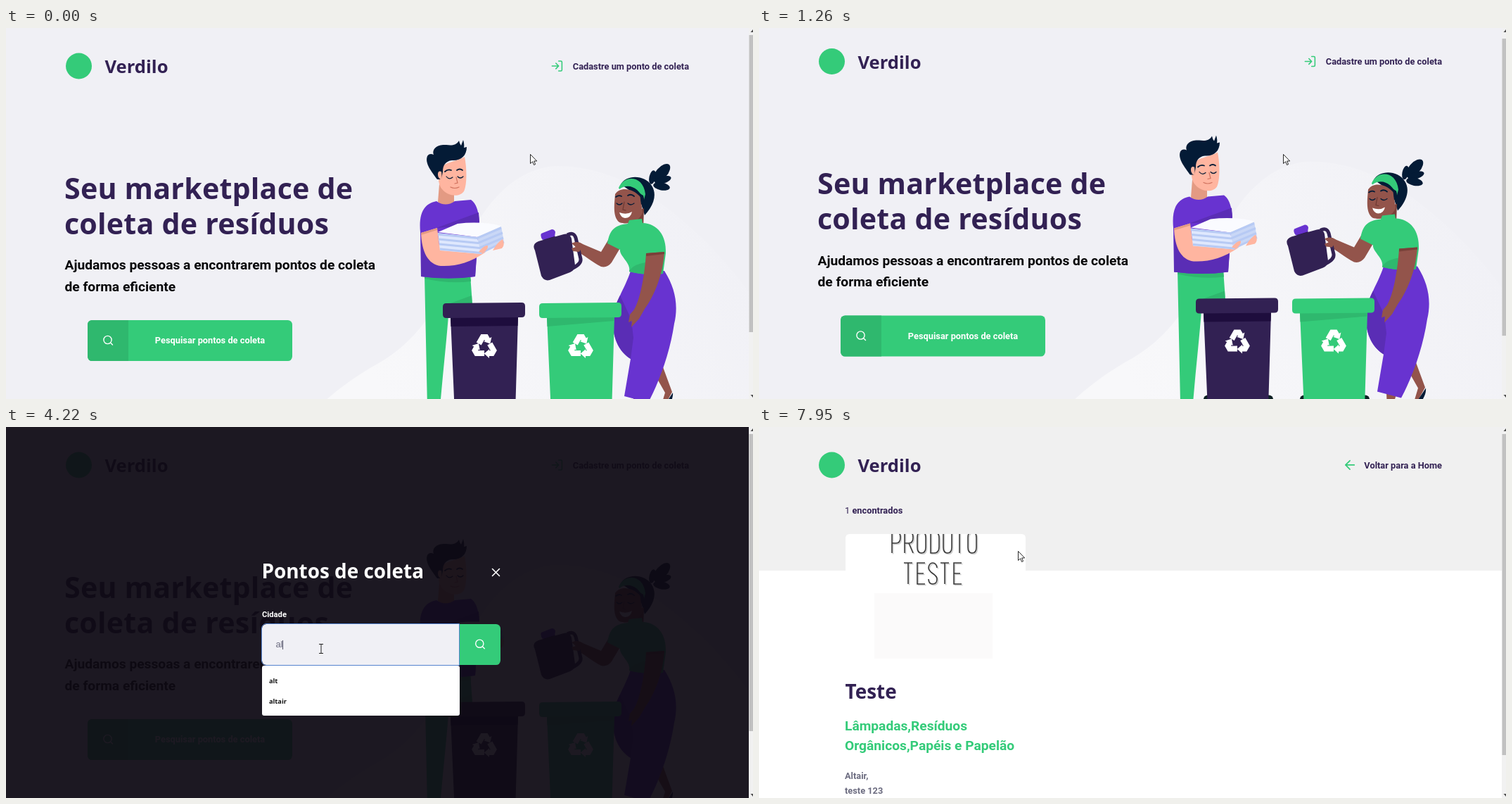
Write an HTML page that moves like this. It is 1062 px wide and 527 px high and loops after 8 s.

```html
<!DOCTYPE html>
<html lang="pt-BR">
<head>
<meta charset="utf-8">
<title>Pontos de coleta</title>
<style>
@property --s { syntax: "<number>"; inherits: true; initial-value: 0; }
html, body { margin: 0; width: 100%; height: 100%; overflow: hidden; background: #f0f0f5; }
svg { display: block; --s: 0; }
svg, .a { animation: 8s step-end infinite; }
svg { animation-name: scroll; }
#home { transform: translateY(calc(var(--s) * -1px)); }
#thumb { transform: translateY(calc(var(--s) * .787px)); animation-name: thumb; }

text { font: 600 12.8px Roboto, sans-serif; fill: #322153; }
.h { font-family: "Noto Sans", "Open Sans", sans-serif; font-weight: 700; }
.h1 { font-size: 41.2px; letter-spacing: .2px; }
.h2 { font-size: 27.9px; }
.brand { font-size: 25.6px; }
.sub { font-size: 19.2px; fill: #060608; }
.bold { font-weight: 700; }
.field { font: 12.8px "Liberation Sans", Arial, sans-serif; fill: #757575; }
.typed { fill: #6c6c80; }
.typed tspan { fill-opacity: 0; }
.opt text { font: 600 9.2px "Noto Sans", sans-serif; fill: #111; }

.green { fill: #34cb79; } .green2 { fill: #2fb86e; }
.purple { fill: #6833d0; } .purple2 { fill: #5a2db5; }
.plum { fill: #322153; } .plum2 { fill: #1e0d3d; }
.navy { fill: #041b36; } .wheel { fill: #0b2023; }
.skin { fill: #ffb5a0; } .skin2 { fill: #e39a83; }
.brown { fill: #93544b; } .brown2 { fill: #7a4039; }
.white { fill: #fff; } .grey { fill: #6c6c80; }
.line { fill: none; stroke: #041b36; stroke-linecap: round; stroke-width: 1.2; }
.icon { fill: none; stroke: #fff; stroke-width: 2; stroke-linecap: round; stroke-linejoin: round; }
.icon.gr { stroke: #34cb79; }

@keyframes scroll {
  0% { --s: 0 } 6% { --s: 12 } 7% { --s: 60 } 7.875% { --s: 91.5 } 8.875% { --s: 104 } 9.875% { --s: 106 }
  13.625% { --s: 88 } 14.75% { --s: 40 } 15.75% { --s: 6.5 } 16.75% { --s: 0 }
}
@keyframes thumb { 0% { height: 422px } 92.75% { height: 456px } }
@keyframes bubble {
  0% { opacity: 0 } 23.5% { opacity: 1 } 26.5% { opacity: .7 } 27.5% { opacity: .4 }
  28.5% { opacity: .14 } 29.5% { opacity: 0 }
}
@keyframes modal { 0% { opacity: 0 } 25.5% { opacity: 1 } }
@keyframes result { 0% { opacity: 0 } 92.75% { opacity: 1 } }
@keyframes ring { 0% { opacity: 0 } 39.875% { opacity: 1 } 79.875% { opacity: 0 } }
@keyframes hint { 0% { opacity: 1 } 52.75% { opacity: 0 } }
@keyframes al { 52.75% { fill-opacity: 1 } 100% { fill-opacity: 1 } }
@keyframes t { 54.625% { fill-opacity: 1 } 100% { fill-opacity: 1 } }
@keyframes alta { 57.75% { fill-opacity: 1 } 100% { fill-opacity: 1 } }
@keyframes i { 59.625% { fill-opacity: 1 } 100% { fill-opacity: 1 } }
@keyframes r { 61.5% { fill-opacity: 1 } 100% { fill-opacity: 1 } }
@keyframes caret {
  0% { opacity: 0; transform: translateX(383px) } 39.875% { opacity: 1 } 46.75% { opacity: 0 }
  52.75% { opacity: 1; transform: translateX(393px) } 54.625% { transform: translateX(397px) }
  57.75% { transform: translateX(404px) } 59.625% { transform: translateX(407px) }
  61.5% { transform: translateX(411px) } 68.5% { opacity: 0 } 75% { opacity: 1 } 79.875% { opacity: 0 }
}
@keyframes drop { 0% { opacity: 0 } 40.75% { opacity: 1 } 61.5% { opacity: 0 } }
@keyframes box { 0% { height: 187px } 52.75% { height: 71px } 57.75% { height: 42px } }
@keyframes first { 0% { opacity: 1 } 57.75% { opacity: 0 } }
@keyframes second { 0% { transform: none } 57.75% { transform: translateY(-29px) } }
@keyframes move {
  0% { transform: translate(745px, 179px) }
  18.625% { transform: translate(720px, 200px) } 19.625% { transform: translate(610px, 275px) }
  20.625% { transform: translate(480px, 365px) } 21.5% { transform: translate(390px, 420px) }
  22.5% { transform: translate(330px, 445px) } 23.5% { transform: translate(314px, 450px) }
  32.375% { transform: translate(322px, 444px) } 33.25% { transform: translate(345px, 425px) }
  34.25% { transform: translate(372px, 397px) } 35.25% { transform: translate(402px, 362px) }
  36.125% { transform: translate(428px, 332px) } 37.125% { transform: translate(442px, 319px) }
  38% { transform: translate(448px, 315px) }
  71.25% { transform: translate(470px, 311px) } 72.125% { transform: translate(520px, 304px) }
  73.125% { transform: translate(565px, 299px) } 74.125% { transform: translate(597.5px, 297px) }
  75% { transform: translate(620px, 297px) } 76% { transform: translate(640px, 299px) }
  77% { transform: translate(652px, 302px) } 78.875% { transform: translate(660px, 304px) }
  80.875% { transform: translate(664px, 305px) }
  89.625% { transform: translate(570px, 304px) } 90.625% { transform: translate(472px, 303px) }
  98.5% { transform: translate(405px, 222px) } 99.375% { transform: translate(368px, 176px) }
}
@keyframes arrow { 0% { opacity: 1 } 36.125% { opacity: 0 } 77% { opacity: 1 } }
@keyframes beam { 0% { opacity: 0 } 36.125% { opacity: 1 } 77% { opacity: 0 } }
</style>
</head>
<body>
<svg width="1062" height="527" viewBox="0 0 1062 527">
<defs>
  <linearGradient id="fade" gradientUnits="userSpaceOnUse" x1="560" y1="560" x2="1010" y2="290">
    <stop offset="0" stop-color="#f8f8fa"/><stop offset="1" stop-color="#f1f1f6"/>
  </linearGradient>
  <clipPath id="photo"><path d="M123 330V158q0-6 6-6H373q6 0 6 6V330z"/></clipPath>
  <path id="bend" d="M-11.300-6.500-4.600-18H4.600L7.800-12.600 10.400-14.100 8.300-4.500-.800-7.700 1-8.800 0-10.300-4.300-2.500z"/>
  <g id="cycle" class="white">
    <use href="#bend"/><use href="#bend" transform="rotate(120)"/><use href="#bend" transform="rotate(240)"/>
  </g>
  <path id="lens" class="icon" d="M19 11a8 8 0 1 1-16 0a8 8 0 0 1 16 0M21 21l-4.350-4.350"/>
  <g id="bin">
    <rect x="11" y="138" width="13" height="34" rx="6" class="wheel"/>
    <rect x="97" y="138" width="13" height="34" rx="6" class="wheel"/>
    <path d="M11 20H107L103 158Q102 165 95 165L25 166Q18 166 17 159z"/>
  </g>
  <path id="lid" d="M5 1 112 0Q117 0 117 5V16Q117 21 112 21L5 22Q0 22 0 17V6Q0 1 5 1z"/>
  <g id="head">
    <circle cx="103.500" cy="54" r="18.500" class="green"/>
    <text x="140.500" y="64" class="h brand">Verdilo</text>
  </g>
  <path id="P" d="M0 30V0H6Q12 0 12 8T6 16H0"/>
  <path id="R" d="M0 30V0H6Q12 0 12 8T6 16H0M6 16 12 30"/>
  <path id="O" d="M0 8Q0 0 6 0T12 8V22Q12 30 6 30T0 22z"/>
  <path id="D" d="M0 0H5Q12 0 12 9V21Q12 30 5 30H0z"/>
  <path id="U" d="M0 0V22Q0 30 6 30T12 22V0"/>
  <path id="T" d="M0 0H12M6 0V30"/>
  <path id="E" d="M11 0H0V30H11M0 15H9"/>
  <path id="S" d="M12 7Q11 0 6 0T0 7Q0 11 6 15T12 23Q12 30 6 30T0 23"/>
  <g id="words" fill="none" stroke-width="1.600">
    <use href="#P" x="189" y="149"/><use href="#R" x="207" y="149"/><use href="#O" x="225" y="149"/>
    <use href="#D" x="244" y="149"/><use href="#U" x="262" y="149"/><use href="#T" x="279" y="149"/>
    <use href="#O" x="297" y="149"/>
    <use href="#T" x="206" y="193"/><use href="#E" x="225" y="193"/><use href="#S" x="241" y="193"/>
    <use href="#T" x="258" y="193"/><use href="#E" x="277" y="193"/>
  </g>
</defs>

<rect width="1062" height="527" fill="#f0f0f5"/>
<g id="home">
  <path fill="url(#fade)" d="M380 640C400 570 460 515 530 476C600 436 625 370 655 305C680 250 725 197 785 196C850 197 905 225 960 272C1000 305 1035 345 1062 383V640z"/>
  <use href="#head"/>
  <path class="icon gr" transform="translate(774 44.600) scale(.78)" d="M15 3h4a2 2 0 0 1 2 2v14a2 2 0 0 1-2 2h-4M10 17l5-5-5-5M15 12H3"/>
  <text x="971" y="58.500" text-anchor="end">Cadastre um ponto de coleta</text>
  <text class="h h1" x="83" y="242.500">Seu marketplace de</text>
  <text class="h h1" x="83" y="292.500">coleta de resíduos</text>
  <text class="sub" x="83.500" y="343">Ajudamos pessoas a encontrarem pontos de coleta</text>
  <text class="sub" x="83.500" y="373.500">de forma eficiente</text>
  <rect x="116" y="415" width="291" height="58" rx="6.400" class="green"/>
  <path class="green2" d="M174 415V473H122.400a6.400 6.400 0 0 1-6.400-6.400V421.400a6.400 6.400 0 0 1 6.400-6.400z"/>
  <use href="#lens" transform="translate(136.800 435.300) scale(.7)"/>
  <text x="290" y="448" text-anchor="middle" class="white bold">Pesquisar pontos de coleta</text>

  <ellipse cx="765" cy="553" rx="185" ry="18" fill="#ececf2"/>

  <!-- man -->
  <path class="navy" d="M603 538H615L613 556Q600 558 583 557Q592 551 603 549z"/>
  <path class="green" d="M595 350H660L663 392H630C628 430 622 480 617 539H599z"/>
  <path class="green2" d="M595 352H660L661 360Q630 364 595 356zM629 392 662 380 663 400H629z"/>
  <path class="skin2" d="M616 222 637 234V252Q624 258 614 247z"/>
  <path class="purple" d="M612 246Q625 255 638 246L661 244C669 249 672 262 673 275L667 353Q630 358 590 353L589 290C587 268 591 250 612 246z"/>
  <path class="purple2" d="M667 353Q630 358 590 353V300L616 338Q650 336 669 322z"/>
  <path class="purple2" d="M612 284 672 262 673 276 640 282z"/>
  <path class="skin" d="M617 200C624 190 640 190 652 183C655 198 656 222 651 232C645 241 628 239 620 229C615 224 613 212 617 200z"/>
  <path class="navy" d="M613 215C605 204 595 192 599 182C602 178 605 179 608 180C605 171 614 165 626 166C633 167 640 167 644 160Q645 165 647 167L650 159Q652 166 651 170L655 169C655 182 646 189 634 188C625 189 621 195 621 204L619 215z"/>
  <path class="skin" d="M619 204q-5-2-5 4t6 8z"/>
  <path class="line" style="stroke-width:1.800" d="M624 204q4-4 9-2M641 202q4-3 8 0"/>
  <path class="line" d="M626 211q4 5 9 1M642 211q4 4 8 0"/>
  <path class="line" style="stroke:#d0735f" d="M640 212l2 8-4 1M632 226q6 3 12 0"/>
  <path class="skin" d="M590 291 613 284 616 308C632 318 655 320 672 314L684 308Q690 310 681 319C660 333 640 339 618 338C600 336 591 318 590 291z"/>
  <path class="skin2" d="M590 291 613 284V287L590 294z"/>
  <path fill="#dfe8fd" d="M614 291 670 297 675 321 617 316z"/>
  <path fill="#c9d7f6" d="M670 297 704 282 708 304 675 321z"/>
  <path fill="#fafbff" d="M614 290 642 278Q675 274 704 281L670 297z"/>
  <path fill="none" stroke="#b7caf4" stroke-width="3" d="M614 293 670 298.500 704 284M615 300 671 305.500 706 291M616 307 673 312.500 707 298M617 314 675 319.500 708 304"/>
  <path class="skin" d="M672 318Q680 308 685 309Q686 314 678 320zM692 316Q698 305 706 300Q710 308 705 313z"/>

  <!-- woman -->
  <g class="navy">
    <ellipse cx="932" cy="206" rx="16" ry="8" transform="rotate(-48 932 206)"/>
    <ellipse cx="934" cy="216" rx="12" ry="5" transform="rotate(-18 934 216)"/>
    <ellipse cx="932" cy="225" rx="12" ry="5.500" transform="rotate(10 932 225)"/>
    <ellipse cx="919" cy="212" rx="10" ry="4.500" transform="rotate(-78 919 212)"/>
    <path d="M874 222C882 208 908 208 918 224C926 236 921 252 908 266L900 240z"/>
  </g>
  <path class="brown2" d="M893 262 907 256 906 284H888z"/>
  <path class="brown" d="M866 236C872 226 890 226 902 240L905 262C900 276 884 280 872 276C862 268 865 250 866 236z"/>
  <path class="green" d="M871 227C879 208 906 209 909 236L907 244C900 228 886 219 872 229z"/>
  <path class="navy" d="M901 235l5 3q3 8-3 13z"/>
  <path class="line" style="stroke-width:1.800" d="M867 240q4-3 8-1M884 238q5-3 9 1"/>
  <path class="line" d="M868 249q4 4 8 0M884 249q4 4 9 0"/>
  <path class="line" style="stroke:#6c3832" d="M879 247l-2 11 4 1"/>
  <path class="white" d="M872 262Q882 266 890 261Q888 270 880 270Q874 269 872 262z"/>
  <path class="brown" d="M920 488 933 479 947 517 934 541 931 538 937 518z"/>
  <path class="navy" d="M948 518Q949 527 941 538L933 548Q931 540 936 536z"/>
  <path class="brown" d="M892 524H907L897 557 880 558 893 548z"/>
  <path class="navy" d="M864 561Q876 556 884 553Q890 556 897 553L895 559Q878 563 864 562z"/>
  <path class="purple" d="M888 345H936C952 370 956 395 950 420C944 460 930 500 913 532L879 523 888 470C872 460 861 440 863 410C865 390 880 370 888 345z"/>
  <path class="purple2" d="M873 380 889 414 892 440 888 470C872 460 861 440 863 410Q865 395 873 380z"/>
  <path class="brown" d="M805 307Q811 301 820 307L846 318 858 298 877 306 861 333Q855 341 846 339C832 332 822 322 810 317z"/>
  <path class="green" d="M884 278 886 273 904 271 905 277C926 278 939 294 938 320L934 349Q910 352 886 346C889 334 872 324 873 315L855 306C858 288 864 280 884 278z"/>
  <path class="green2" d="M886 346Q890 336 910 333L934 330V349Q910 352 886 346z"/>
  <path class="brown" d="M910 320 936 318C934 350 922 380 908 399L900 413 889 425 890 416 885 418 887 407 893 400C902 385 908 350 910 320z"/>
  <path class="brown2" d="M910 320 936 318V321L910 324z"/>

  <!-- jug -->
  <path d="M798 294Q807 289 810 298L817 328Q818 335 806 341" fill="none" stroke="#322153" stroke-width="5"/>
  <path class="white" d="M802 299Q806 297 807 301L813 326Q814 331 805 334z"/>
  <path class="plum2" d="M764 299 780 294 782 304 766 307z"/>
  <path class="plum" d="M752 316Q747 307 757 303L793 293Q801 291 804 299L809 337Q809 344 802 347L773 358Q765 360 761 352z"/>
  <path class="purple" d="M761 292 776 286Q780 286 781 290L780 296 763 301Q759 296 761 292z"/>
  <path class="brown" d="M804 306q8-5 17 2l-6 10-9-1-2-4 6-2z"/>

  <!-- bins -->
  <use href="#bin" class="plum" transform="translate(621 390)"/>
  <path class="plum2" d="M632 411H728L727.500 423 632.500 424z"/>
  <use href="#lid" class="plum" x="621" y="390"/>
  <use href="#cycle" transform="translate(680 453)"/>
  <use href="#bin" class="green" transform="translate(758 390)"/>
  <path class="green2" d="M769 411H865L864.500 416 769.500 424z"/>
  <use href="#lid" class="green" x="758" y="390"/>
  <use href="#cycle" transform="translate(817 453)"/>
</g>

<g class="a" style="animation-name:modal">
  <rect width="1056" height="527" fill="#0e0a14" fill-opacity=".937"/>
  <text class="h h2 white" x="363.500" y="215">Pontos de coleta</text>
  <path class="icon" style="stroke-width:1.600" d="M691.500 201.500l10 10m0-10l-10 10"/>
  <text class="white bold" style="font-size:11.200px" x="364" y="270">Cidade</text>
  <path fill="#f0f0f5" d="M645 280V338H370.400a6.400 6.400 0 0 1-6.400-6.400V286.400a6.400 6.400 0 0 1 6.400-6.400z"/>
  <path class="green" d="M645 280H696.600a6.400 6.400 0 0 1 6.400 6.400V331.600a6.400 6.400 0 0 1-6.400 6.400H645z"/>
  <use href="#lens" transform="translate(665.600 300) scale(.7)"/>
  <path class="a" style="animation-name:ring" fill="none" stroke="#5583cf" d="M644.500 279.500V338.500H370a6.500 6.500 0 0 1-6.500-6.500V286a6.500 6.500 0 0 1 6.500-6.500z"/>
  <text class="field a" style="animation-name:hint" x="383.500" y="313">Pesquise por cidade</text>
  <text class="field typed" x="383.500" y="313"><tspan class="a" style="animation-name:al">al</tspan><tspan class="a" style="animation-name:t">t</tspan><tspan class="a" style="animation-name:alta">a</tspan><tspan class="a" style="animation-name:i">i</tspan><tspan class="a" style="animation-name:r">r</tspan></text>
  <rect class="a" style="animation-name:caret" y="303" width="1" height="13" fill="#55556a"/>
  <g class="opt a" style="animation-name:drop">
    <rect class="a white" style="animation-name:box" x="364" y="339" width="281" height="71" rx="3"/>
    <text class="a" style="animation-name:first" x="374" y="364">alt</text>
    <text class="a" style="animation-name:second" x="374" y="393">altair</text>
    <g class="a" style="animation-name:hint">
      <text x="374" y="422">teste</text><text x="374" y="451">cidade</text>
      <text x="374" y="480">centro</text><text x="374" y="509">teste 1</text>
    </g>
  </g>
</g>
<rect class="a" style="animation-name:bubble" y="507" width="88.500" height="20" fill="#dfe1e5"/>

<g class="a" style="animation-name:result">
  <rect width="1062" height="527" class="white"/>
  <rect width="1062" height="204" fill="#f0f0f0"/>
  <use href="#head"/>
  <path class="icon gr" transform="translate(829.500 43.400) scale(.88)" d="M19 12H5M12 19l-7-7 7-7"/>
  <text x="971" y="58.500" text-anchor="end">Voltar para a Home</text>
  <text x="122" y="122.500"><tspan font-weight="400">1</tspan> encontrados</text>
  <g clip-path="url(#photo)" role="img" aria-label="Produto teste">
    <rect x="123" y="152" width="256" height="178" class="white"/>
    <rect x="164" y="236" width="168" height="93" fill="#fbfafa"/>
    <use href="#words" x="1.500" y="1.500" stroke="#ccc"/>
    <use href="#words" stroke="#3a3a3a"/>
  </g>
  <text class="h h2" x="122.500" y="386">Teste</text>
  <text class="sub" style="fill:#34cb79" x="122" y="431">Lâmpadas,Resíduos</text>
  <text class="sub" style="fill:#34cb79" x="122" y="458.500">Orgânicos,Papéis e Papelão</text>
  <text class="grey" x="122" y="499.500">Altair,</text>
  <text class="grey" x="122" y="520.500">teste 123</text>
</g>

<rect x="1056" width="6" height="527" fill="#f1f1f1"/>
<rect id="thumb" class="a" x="1056.500" y="10" width="5.500" height="422" fill="#c1c1c1"/>
<path fill="#505050" d="M1058.500 6l3.500-4v4zM1058.500 521l3.500 4v-4z"/>

<g class="a" style="animation-name:move">
  <path class="a" style="animation-name:arrow" fill="#fff" stroke="#111" stroke-width=".9" d="M.5.5V13.500L3.600 10.800 5.600 15.500 7.600 14.600 5.600 10H9.700z"/>
  <path class="a" style="animation-name:beam" fill="none" stroke="#222" d="M-3-6.500H3M0-6.500V6.500M-3 6.500H3"/>
</g>
</svg>
</body>
</html>
```
